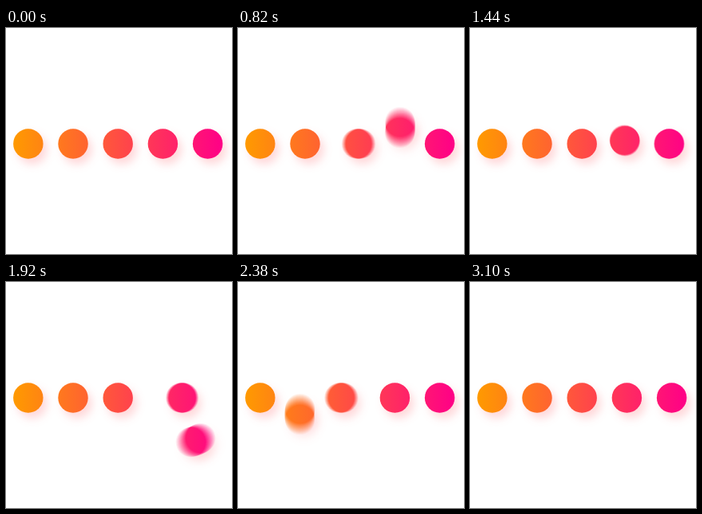
An HTML page with a canvas that plays this animation: 283 by 283 pixels, repeating every 3.12 s.

```html
<!DOCTYPE html>
<html lang="en">
<head>
<meta charset="utf-8">
<title>Dots</title>
<style>
  html, body { margin: 0; width: 100%; height: 100%; overflow: hidden; background: #fff; }
  canvas { display: block; width: 283px; height: 283px; }
</style>
</head>
<body>
<canvas id="stage" width="283" height="283"></canvas>
<script>
const SIZE = 283;
const LOOP = 3120, HALF = LOOP / 2, STEP = 20;
const CENTER = { x: 140.2, y: 145 };
const GAP = 56.2, RADIUS = 18.7, DOTS = 5, SWAPS = DOTS - 1;
const SHUTTER = 26, SAMPLES = 15;

// The hop follows a circle through both slots, peaking one gap away.
const HOP_R = GAP * 0.625, HOP_RISE = GAP * 0.375;
const HOP_START = Math.atan2(HOP_RISE, GAP / 2);
const HOP_SWEEP = Math.PI + 2 * HOP_START;

const stage = document.getElementById('stage').getContext('2d');
const layer = document.createElement('canvas');
layer.width = layer.height = SIZE;
const ink = layer.getContext('2d');

const tint = ink.createLinearGradient(9, 0, 271, 0);
tint.addColorStop(0, '#ff9a00');
tint.addColorStop(1, '#ff0087');

const smooth = x => x * x * (3 - 2 * x);
const mix = (a, b, f) => a + (b - a) * f;

// Dot positions relative to the center of the row.
function pose(time) {
  const t = ((time % LOOP) + LOOP) % LOOP;
  const side = t < HALF ? 1 : -1;
  const run = SWAPS * smooth((t % HALF) / HALF);
  const slot = Math.min(SWAPS - 1, Math.floor(run));
  const p = run - slot;
  const slotX = i => (i - SWAPS / 2) * GAP;

  const points = [];
  for (let i = 0; i < DOTS; i++) {
    if (i !== slot && i !== slot + 1) points.push([slotX(i), 0]);
  }
  points.push([slotX(slot + p), 0]);

  const angle = HOP_START - HOP_SWEEP * mix(p, smooth(p), 0.55);
  points.push([
    slotX(slot + 0.5) + HOP_R * Math.cos(angle),
    HOP_R * Math.sin(angle) - HOP_RISE
  ]);
  return points.map(([x, y]) => [side * x, side * y]);
}

function drawDots(time) {
  ink.clearRect(0, 0, SIZE, SIZE);
  ink.globalCompositeOperation = 'lighter';
  ink.globalAlpha = 1 / SAMPLES;
  ink.fillStyle = '#fff';
  for (let i = 0; i < SAMPLES; i++) {
    const offset = ((i + 0.5) / SAMPLES - 0.5) * SHUTTER;
    for (const [x, y] of pose(time + offset)) {
      ink.beginPath();
      ink.arc(CENTER.x + x, CENTER.y + y, RADIUS, 0, 2 * Math.PI);
      ink.fill();
    }
  }
  ink.globalCompositeOperation = 'source-in';
  ink.globalAlpha = 1;
  ink.fillStyle = tint;
  ink.fillRect(0, 0, SIZE, SIZE);
  ink.globalCompositeOperation = 'source-over';
}

function render(time) {
  drawDots(time);
  stage.shadowColor = 'transparent';
  stage.fillStyle = '#fff';
  stage.fillRect(0, 0, SIZE, SIZE);
  stage.shadowColor = 'rgba(255, 50, 60, 0.19)';
  stage.shadowOffsetX = 5;
  stage.shadowOffsetY = 7;
  stage.shadowBlur = 11;
  stage.drawImage(layer, 0, 0);
}

const start = performance.now();
function tick() {
  const elapsed = performance.now() - start;
  render(Math.floor(elapsed / STEP) * STEP + STEP / 2);
  requestAnimationFrame(tick);
}
tick();
</script>
</body>
</html>
```
